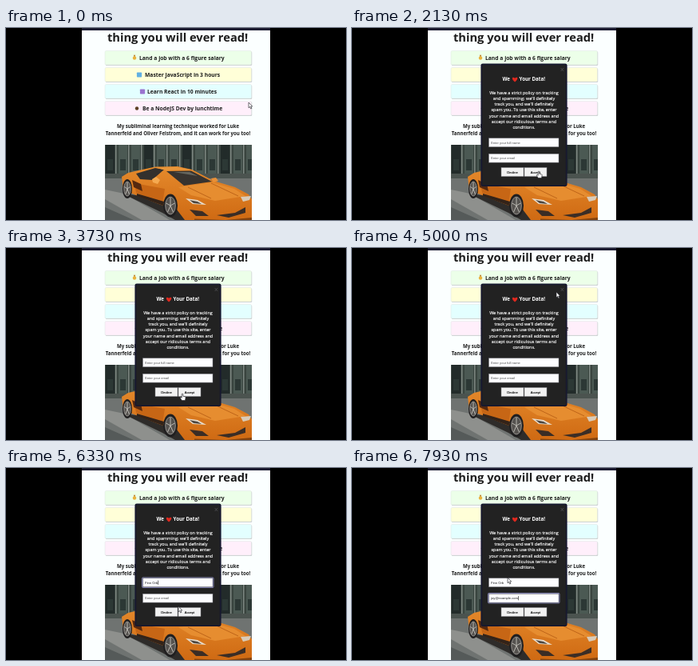
Recreate the animation shown at these times as an HTML page. Size 426x240 px, loop 8 s.

```html
<!DOCTYPE html>
<html lang="en">
<head>
<meta charset="utf-8">
<title>Pop-up form</title>
<style>
  html, body { margin: 0; width: 100%; height: 100%; overflow: hidden; background: #000; }
  svg { display: block; width: 100vw; height: 100vh; }
  text { font-family: "Open Sans", sans-serif; fill: #1c1c1c; }
  .title { font-size: 14.7px; font-weight: 700; text-anchor: middle; }
  .offer { font-size: 6.74px; font-weight: 700; }
  .note { font-size: 6.1px; font-weight: 700; text-anchor: middle; }
  .head { font-size: 6.2px; font-weight: 700; fill: #fff; }
  .body { font-size: 5.5px; fill: #fff; stroke: #fff; stroke-width: .14; text-anchor: middle; }
  .field, .button text { font-family: "Liberation Sans", Arial, sans-serif; font-size: 4.1px; }
  .button text { text-anchor: middle; fill: #111; stroke: #111; stroke-width: .12; }
  .button rect { fill: #f1f1f1; stroke: #8a8a90; stroke-width: .5; }
</style>
</head>
<body>
<svg viewBox="0 0 426 240">
  <defs>
    <clipPath id="photoClip"><path d="M124 146H308V240H124Z"/></clipPath>
    <linearGradient id="paint" x2="0" y2="1">
      <stop stop-color="#e58a2c"/><stop offset="1" stop-color="#cf6a13"/>
    </linearGradient>
  </defs>
  <rect width="426" height="240"/>
  <rect x="95" width="236" height="240" fill="#fbffff"/>
  <rect x="95" width="236" height="3" fill="#1c1b30"/>
  <text class="title" x="215.1" y="17">thing you will ever read!</text>
  <g id="offers"></g>
  <text class="note" x="215.5" y="124.8">My subliminal learning technique worked for Luke</text>
  <text class="note" x="215.5" y="134">Tannerfeld and Oliver Felstrom, and it can work for you too!</text>

  <g clip-path="url(#photoClip)">
    <rect x="124" y="146" width="184" height="94" fill="#39443f"/>
    <g id="columns"></g>
    <path d="M124 182H308V190H124Z" fill="#4b534f"/>
    <path d="M124 188H308V240H124Z" fill="#6f7371"/>
    <path d="M124 202 148 207 205 240H170L124 214Z" fill="#8e908d"/>
    <path d="M124 224 160 240H124Z" fill="#555a59"/>
    <path d="M146 207 196 231 212 240H308V226Z" fill="#2e2c2a"/>
    <path d="M145 186 153 181 166 178 187 173.500 215 173 233 177 260 191 287 199 304 208 308 214V240H224L214 227 194 221 158 207 147 203Z" fill="url(#paint)"/>
    <path d="M163 182 187 175 198 177 183 190 168 189Z" fill="#33302d"/>
    <path d="M201 179 232 178.500 258 192 223 197Z" fill="#37332f"/>
    <path d="M210 180 230 180 240 185Z" fill="#66665e"/>
    <path d="M187 174.500 213 174 232 177 201 178Z" fill="#e8973c"/>
    <path d="M216 199 258 193 286 201 300 210 262 216 232 209Z" fill="#e68d30"/>
    <path d="M228 199 257 213M257 194 291 210" fill="none" stroke="#b45b13" stroke-width=".8"/>
    <path d="M161 194 199 201 196 219 163 206Z" fill="#c76615"/>
    <path d="M158 190 169 195 171 204 160 199Z" fill="#56290f"/>
    <path d="M164 207 198 217 197 222 164 210Z" fill="#332319"/>
    <path d="M183 189 188 186 193 190 190 195 184 193Z" fill="#f5a950"/>
    <path d="M257 188 263 187 266 191 260 193Z" fill="#e89038"/>
    <path d="M225 213 240 215 251 221 234 220Z" fill="#e9dccb"/>
    <path d="M230 215 240 217 245 220 235 219Z" fill="#4e4740"/>
    <path d="M294 211 307 210 305 215 297 217Z" fill="#d9cbb8"/>
    <path d="M230 227 246 229 254 235 238 235ZM264 234 287 231 300 224V231L279 237Z" fill="#3b2d25"/>
    <path d="M236 238.500 275 240 308 237V240H236Z" fill="#81420f"/>
    <g id="wheels"></g>
  </g>

  <g id="modal">
    <rect x="162.300" y="45.300" width="106.400" height="151.900" rx="1.500" fill="#222" stroke="#17182f" stroke-width="1.800"/>
    <path d="M261.700 50l3.400 4m0-4l-3.400 4" stroke="#5f5f66" stroke-width=".6"/>
    <text class="head" x="188.500" y="66.300">We</text>
    <path d="M204.100 67.600C198.500 63.200 201.200 60.100 204.100 62.800C207 60.100 209.700 63.200 204.100 67.600Z" fill="#e0291f"/>
    <text class="head" x="209.600" y="66.300">Your Data!</text>
    <g id="copy"></g>
    <g id="fields"></g>
    <g id="buttons"></g>
  </g>
  <g id="cursor" stroke="#25252b" stroke-width=".65" stroke-linejoin="round">
    <path id="arrow" d="M0 0V6.800L1.500 5.400 2.700 8 3.900 7.400 2.700 5H4.700Z" fill="#fff"/>
    <path id="hand" d="M-.8.500Q0-.5.8.500V3.200L3.700 4Q4.300 4.300 4.100 5.200L3.500 8.600H-.7L-2.600 5.500Q-2.800 4.300-1.700 4.600L-.8 5.300Z" fill="#fff"/>
  </g>
</svg>
<script>
const LOOP = 8000, STEP = LOOP / 120;
const $ = id => document.getElementById(id);

function add(parent, tag, attrs, text = '') {
  const node = document.createElementNS('http://www.w3.org/2000/svg', tag);
  for (const key in attrs) node.setAttribute(key, attrs[key]);
  node.textContent = text;
  return parent.appendChild(node);
}

const show = (node, on) => { node.style.display = on ? '' : 'none'; };

// Offers: text, text x, fill, icon x, icon colour, icon size, round icon
[
  ['Land a job with a 6 figure salary', 167, '#ecffe9', 161, '#e9b23c', 4.4, true],
  ['Master JavaScript in 3 hours', 174, '#ffffd8', 167, '#62b0e2', 6.2, false],
  ['Learn React in 10 minutes', 177, '#e3ffff', 171, '#9a73cf', 6.2, false],
  ['Be a NodeJS Dev by lunchtime', 171, '#ffeffb', 164, '#5d3f24', 4.4, true]
].forEach(([label, x, fill, iconX, color, size, round], i) => {
  const y = 28.5 + i * 21, g = $('offers');
  add(g, 'rect', { x: 124.7, y: y + .8, width: 183.5, height: 17.6, rx: 1.5, fill: '#c9cdce' });
  add(g, 'rect', { x: 124, y, width: 183.5, height: 17.6, rx: 1.5, fill, stroke: '#dfe5e2', 'stroke-width': .5 });
  add(g, 'rect', { x: iconX - size / 2, y: y + 9 - size / 2, width: size, height: size, rx: round ? size / 2 : .8, fill: color });
  if (i === 0) add(g, 'path', { d: `M${iconX - 1.2} ${y + 5.2}h2.4l-.8 2h-.8Z`, fill: '#b77a24' });
  add(g, 'text', { class: 'offer', x, y: y + 11.2 }, label);
});

for (let i = 0; i < 12; i++) {
  const x = 125 + i * 16;
  add($('columns'), 'rect', { x, y: 146, width: 11, height: 36, fill: i % 3 ? '#4b5953' : '#222b2a' });
  add($('columns'), 'rect', { x: x + 12, y: 146, width: 1.5, height: 38, fill: '#7e8782' });
  add($('columns'), 'rect', { x: x + 2, y: 164, width: 7, height: 14, fill: '#2c3835' });
}

function wheel(cx, cy, rx, ry) {
  const g = $('wheels');
  add(g, 'ellipse', { cx, cy, rx, ry, fill: '#201f20' });
  add(g, 'ellipse', { cx, cy, rx: rx * .7, ry: ry * .75, fill: '#55524f', stroke: '#aaa8a3', 'stroke-width': .8 });
  for (let i = 0; i < 5; i++) {
    const a = i * Math.PI * .4;
    add(g, 'path', { d: `M${cx} ${cy}L${cx + rx * .65 * Math.sin(a)} ${cy - ry * .7 * Math.cos(a)}`, stroke: '#b9b7b1' });
  }
}
wheel(152, 201, 6, 12);
wheel(206, 222, 9, 14.5);

[
  'We have a strict policy on tracking', "and spamming; we'll definitely",
  "track you, and we'll definitely", 'spam you. To use this site, enter',
  'your name and email address and', 'accept our ridiculous terms and', 'conditions.'
].forEach((line, i) => add($('copy'), 'text', { class: 'body', x: 215.5, y: 83.2 + i * 7.08 }, line));

// Fields: each has focus and typing intervals
const fields = [
  { y: 137.8, hint: 'Enter your full name', value: 'Finn Orb', focus: [5530, 6600], start: 5660, pace: 75 },
  { y: 157.3, hint: 'Enter your email', value: 'joy@example.com', focus: [6600, LOOP], start: 6780, pace: 70 }
];
for (const f of fields) {
  const g = $('fields');
  f.ring = add(g, 'rect', { x: 170.6, y: f.y - .8, width: 89.3, height: 12.4, rx: .8, fill: '#080a20', stroke: '#9c9cd2', 'stroke-width': .9 });
  add(g, 'rect', { x: 171.5, y: f.y, width: 87.5, height: 10.8, fill: '#fdfdff', stroke: '#85858e', 'stroke-width': .5 });
  f.text = add(g, 'text', { class: 'field', x: 174.2, y: f.y + 6.8 });
  f.caret = add(g, 'rect', { y: f.y + 2.8, width: .6, height: 5.2, fill: '#111' });
}

function button(label) {
  const g = add($('buttons'), 'g', { class: 'button' });
  add(g, 'rect', { x: 187, y: 174.5, width: 28, height: 11 });
  add(g, 'text', { x: 201, y: 181.5 }, label);
  return g;
}
const accept = button('Accept'), decline = button('Decline');
const MODAL_AT = 460;
const swaps = [1930, 2330, 2665, 3000, 3665];

// Pointer path: time, x, y
const path = [
  [0, 304, 93], [870, 305, 97], [1300, 300, 104], [2000, 230, 180], [2130, 234, 179],
  [2470, 203, 180], [2800, 226, 180], [3130, 202, 181], [3400, 205, 181],
  [3730, 221, 182], [4200, 224, 182], [4800, 258, 57], [5000, 256, 55],
  [5200, 257, 55], [5500, 207, 143], [5800, 207, 144], [6330, 216, 173],
  [6580, 213, 163], [7000, 210, 161], [7930, 195, 137], [LOOP, 195, 137]
];

function pointerAt(t) {
  const i = Math.max(1, path.findIndex(p => p[0] >= t));
  const [t0, x0, y0] = path[i - 1], [t1, x1, y1] = path[i];
  const p = (t - t0) / (t1 - t0), e = p * p * (3 - 2 * p);
  return [x0 + (x1 - x0) * e, y0 + (y1 - y0) * e];
}

function draw(t) {
  show($('modal'), t >= MODAL_AT);
  const swapped = swaps.filter(s => t >= s).length % 2;
  accept.setAttribute('transform', `translate(${swapped ? 29 : 0})`);
  decline.setAttribute('transform', `translate(${swapped ? 0 : 29})`);

  for (const f of fields) {
    const count = Math.max(0, Math.floor((t - f.start) / f.pace) + 1);
    const typed = f.value.slice(0, count);
    const focused = t >= f.focus[0] && t < f.focus[1];
    f.text.textContent = typed || f.hint;
    f.text.style.fill = typed ? '#161616' : '#4c4c4c';
    show(f.ring, focused);
    show(f.caret, focused);
    if (focused) f.caret.setAttribute('x', 174.5 + (typed ? f.text.getComputedTextLength() : 0));
  }

  const [x, y] = pointerAt(t);
  const overButton = x >= 187 && x <= 244 && y >= 174.5 && y <= 185.5;
  $('cursor').setAttribute('transform', `translate(${x} ${y})`);
  show($('hand'), overButton);
  show($('arrow'), !overButton);
}

const origin = performance.now();
function tick() {
  const t = Math.max(0, performance.now() - origin) % LOOP;
  draw(Math.min(119, Math.floor((t + 4) / STEP)) * STEP);
  requestAnimationFrame(tick);
}
tick();
</script>
</body>
</html>
```
